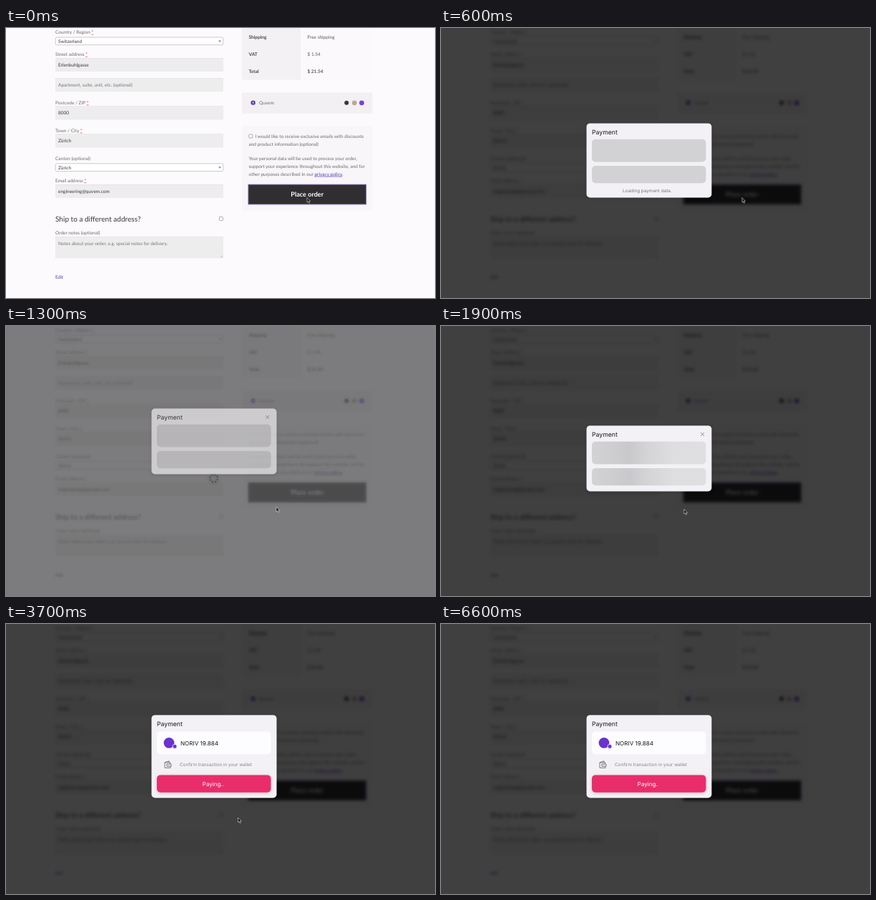
An HTML page that plays this animation: 600x378 px, repeating every 6.7 s.

```html
<!DOCTYPE html>
<html lang="en">
<head>
<meta charset="utf-8">
<title>Checkout</title>
<style>
html, body { margin: 0; width: 100%; height: 100%; overflow: hidden; background: #fcfafd; }
svg, #veil { position: absolute; left: 0; top: 0; width: 600px; height: 378px; }
#veil { background: rgba(0,0,0,.745); backdrop-filter: blur(2px); opacity: 0; }
#page { font: 6.5px Lato, "Open Sans", sans-serif; }
#top { font: 8px Inter, Roboto, sans-serif; }
text { white-space: pre; text-rendering: geometricPrecision; }
.req { fill: #d33; text-decoration: underline; }
.link { fill: #5c3aab; }
</style>
</head>
<body>
<svg id="page" viewBox="0 0 600 378"></svg>
<div id="veil"></div>
<svg id="top" viewBox="0 0 600 378">
  <defs>
    <linearGradient id="shine" gradientUnits="userSpaceOnUse" x1="0" x2="280" y1="0" y2="0">
      <stop offset="0" stop-color="#d4d3d6"/>
      <stop offset=".21" stop-color="#c9c8cb"/>
      <stop offset=".3" stop-color="#d4d3d6"/>
      <stop offset=".43" stop-color="#dedde0"/>
      <stop offset=".7" stop-color="#e0dfe2"/>
      <stop offset="1" stop-color="#d2d1d4"/>
    </linearGradient>
  </defs>
  <g id="dialog"></g>
  <path id="cursor" d="M0 0V6.6L1.5 5.3L2.6 7.8L3.7 7.3L2.6 4.9H4.7Z" fill="#111" stroke="#fff" stroke-width=".5"/>
</svg>
<script>
const LOOP = 6700, STEP = 100;
const $ = id => document.getElementById(id);
const text = (x, y, s, fill = '#6d6b6e', more = '') => `<text x="${x}" y="${y}" fill="${fill}" ${more}>${s}</text>`;
const rect = (x, y, w, h, fill, more = '') => `<rect x="${x}" y="${y}" width="${w}" height="${h}" fill="${fill}" ${more}/>`;
const dot = (x, y, r, fill, more = '') => `<circle cx="${x}" cy="${y}" r="${r}" fill="${fill}" ${more}/>`;
const clamp = v => Math.max(0, Math.min(1, v));
const ramp = (t, start, length) => clamp((t - start) / length);
const ease = x => 1 - (1 - x) ** 2.3;

// Checkout page
const DARK = '#39373b', BOLD = 'font-weight="700"';
const label = (y, s, required) => text(69, y, s + (required ? ' <tspan class="req">*</tspan>' : ''));
const field = (y, s, fill = DARK, h = 19) =>
  rect(69, y, 235, h, '#eeedee') + rect(69, y, 235, .5, '#dddbde') + text(73, y + 11.7, s, fill);
const select = (y, s) => rect(69.25, y, 234.5, 10.7, '#fff', 'rx="1.5" stroke="#aaa8ab" stroke-width=".6"') +
  text(73, y + 7.8, s, DARK) + `<path d="M297 ${y + 4.4}h4l-2 2.6z" fill="#888"/>`;
const check = (x, y) => rect(x, y, 5, 5, '#fff', 'rx=".8" stroke="#777" stroke-width=".6"');
const total = (y, name, value, more = '') => text(339.5, y, name, '#4a484c', BOLD) + text(421.5, y, value, '#5c5a5e', more);

const spinner = Array.from({ length: 8 }, (_, i) =>
  dot(5.4 * Math.cos(i * Math.PI / 4), 5.4 * Math.sin(i * Math.PI / 4), 1.2, '#565458')).join('');

$('page').innerHTML =
  rect(0, 0, 600, 378, '#fcfafd') +
  label(7.8, 'Country / Region', 1) + select(13, 'Switzerland') +
  label(38.8, 'Street address', 1) + field(42, 'Erlenbuhlgasse') +
  field(70.3, 'Apartment, suite, unit, etc. (optional)', '#777579') +
  label(106.5, 'Postcode / ZIP', 1) + field(109.5, '8000') +
  label(145.6, 'Town / City', 1) + field(148.5, 'Zürich') +
  label(185, 'Canton (optional)') + select(189.8, 'Zürich') +
  label(215.5, 'Email address', 1) + field(219, 'engineering@quvem.com') +
  text(69, 270.6, 'Ship to a different address?', '#39373b', 'font-size="10.05"') + check(298.4, 264.4) +
  label(289, 'Order notes (optional)') +
  field(292.3, 'Notes about your order, e.g. special notes for delivery.', '#777579', 30) +
  '<path d="M300 321.5l3-3M302 321.5l1-1" stroke="#888" stroke-width=".5"/>' +
  text(69, 351.4, 'Edit', '#5c3aab') +
  rect(330, 0, 82, 72.5, '#f3f1f4') + rect(412, 0, 100.5, 72.5, '#fbf9fc') +
  total(14.8, 'Shipping', 'Free shipping') + total(38.7, 'VAT', '$ 1.54') + total(62.8, 'Total', '$ 21.54', BOLD) +
  rect(330, 90.5, 182.5, 29.3, '#f2f0f3') +
  dot(345.6, 104.6, 3.2, '#5c3aab') + dot(345.6, 104.6, 1, '#fff') + text(354, 107, 'Quvem') +
  dot(476.3, 104.8, 3, '#39373b') + dot(487.3, 104.8, 3.4, '#bda794') + dot(497.5, 104.8, 3.4, '#7444d8') +
  rect(330, 137.5, 182.5, 118.5, '#f8f6f9') + check(339.8, 149) +
  text(348.5, 154.2, 'I would like to receive exclusive emails with discounts') +
  text(339.5, 164.9, 'and product information (optional)') +
  text(339.5, 185.4, 'Your personal data will be used to process your order,') +
  text(339.5, 196, 'support your experience throughout this website, and for') +
  text(339.5, 206.7, 'other purposes described in our <tspan class="link" text-decoration="underline">privacy policy</tspan>.') +
  rect(339, 219.2, 164.6, 27.6, '#302e31', 'stroke="#6e5a99" stroke-width="1"') +
  text(421.2, 236.3, 'Place order', '#fff', BOLD + ' font-size="9.1" text-anchor="middle"') +
  `<g id="block">${rect(0, 0, 600, 378, '#fcfafd', 'opacity=".52"')}<g id="spin">${spinner}</g></g>`;

// Payment dialog: every part is placed relative to its top edge
const PINK = '#e92d6b', SHADOW = 'style="filter:drop-shadow(0 1px 2px #0003)"';
const shell = h => rect(203.5, 0, 175, h, '#f3f1f5', `rx="5" ${SHADOW}`) + text(211, 15.5, 'Payment', '#19171b', 'font-size="8.7"');
const bars = rect(211, 22.4, 159.5, 31.6, 'url(#shine)', 'rx="5"') + rect(211, 59.6, 159.5, 24.3, 'url(#shine)', 'rx="5"');
const close = '<path d="M363.2 9.6l5 5m0-5l-5 5" stroke="#77757a" stroke-width=".8"/>';
const card = rect(211, 23.2, 159.5, 31.6, '#fdfcfe', 'rx="5"') + dot(228, 39, 7.4, '#6a32d0') +
  dot(236, 44, 3, '#6a32d0', 'stroke="#fff" stroke-width=".8"') + text(244, 42.4, 'NORIV 19.884', '#19171b', 'font-size="8.1"');
const button = (y, label, x, fill = PINK) =>
  rect(211, y, 159.5, 24.4, fill, `rx="5" ${SHADOW}`) + text(x, y + 15.6, label, '#fff');
const wallet = '<path d="M222 66.5h7.5v2M222 66.5v7.5h8v-2M222 66.5l6-2v2M225 68.6h6v3.2h-6zM227 70.2h.6" fill="none" stroke="#5f5d62" stroke-width=".8"/>';

// Three dots that light up one after the other
function dots(t) {
  const phase = ((t + LOOP - 5850) % 1000 + 1000) % 1000 / 1000;
  return [.2, .4, .6].map(s => `<tspan fill-opacity="${ramp(phase, s, .2)}">.</tspan>`).join('');
}

function dialog(t) {
  if (t < 1100) return [104, bars + text(254, 96.4, 'Loading payment data' + dots(t), '#77757a', 'font-size="6.35"')];
  if (t < 2000) return [92, bars + close];
  if (t < 3100) {
    const hover = t >= 2700;
    return [92, `<g transform="translate(0 -.8)">${card}</g><path d="M360 36l2.4 2.4l-2.4 2.4" fill="none" stroke="#99979c" stroke-width=".8"/>` +
      close + button(59.6, 'Pay', 284, hover ? '#d92863' : PINK)];
  }
  return [116, card + wallet + text(243, 71.8, 'Confirm transaction in your wallet', '#858388', 'font-size="6.34"') +
    button(84, 'Paying' + dots(t), 274.8)];
}

const path = [[0, 421, 237.5], [700, 421, 237.5], [1100, 428, 249], [1300, 378, 253.5], [1900, 340, 256.5],
  [2100, 333, 256], [2400, 333, 256], [2800, 322, 212], [3100, 322, 212], [3700, 324.5, 271],
  [4400, 326, 276], [5000, 537, 292], [LOOP, 537, 292]];

function cursorAt(t) {
  const i = path.findIndex(p => p[0] > t), [t0, x0, y0] = path[i - 1], [t1, x1, y1] = path[i];
  const k = (t - t0) / (t1 - t0);
  return [x0 + (x1 - x0) * k, y0 + (y1 - y0) * k];
}

function draw() {
  const t = Math.floor(performance.now() % LOOP / STEP) * STEP;
  const open = t < 1100 ? ease(ramp(t, 0, 380)) - ease(ramp(t, 600, 400)) : ease(ramp(t, 1150, 380));
  $('veil').style.opacity = open;

  const [height, parts] = dialog(t);
  const y = 185.4 - height / 2 - 76 * (1 - open);
  $('dialog').innerHTML = shell(height) + parts;
  $('dialog').setAttribute('transform', `translate(0 ${y})`);
  $('dialog').setAttribute('opacity', open);
  $('shine').setAttribute('gradientTransform', `translate(${205 + (t - 1900) * .5} 0)`);

  $('block').setAttribute('opacity', ramp(t, 850, 200) - ramp(t, 1400, 200));
  $('spin').setAttribute('transform', `translate(290.6 213.2) rotate(${t * .36})`);

  $('cursor').setAttribute('transform', `translate(${cursorAt(t)})`);
  $('cursor').setAttribute('opacity', t < 5100 ? 1 : 0);
  requestAnimationFrame(draw);
}
draw();
</script>
</body>
</html>
```
